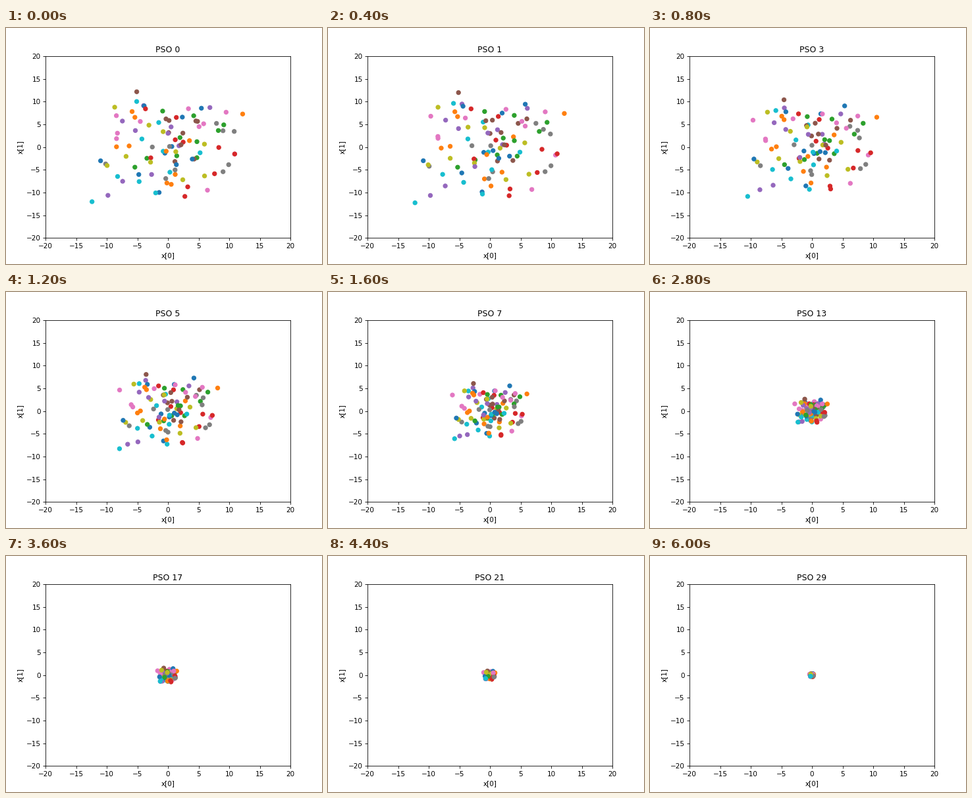
These frames come from a looping animation (480 px wide and 360 px high, 6.2 s). A matplotlib script:

```python
import numpy as np
import matplotlib.pyplot as plt
from matplotlib.animation import FuncAnimation

STEP_MS = 200
STEPS = 30
HOLD = 1  # extra ticks on the first step
COUNT = 100
REACH = 11.5

# Outlying particles, one per colour of the default cycle
OUTLIERS = [(-11, -3), (12.2, 7.3), (-5.4, -4.4), (10.9, -1.5), (-9.8, -10.6),
            (-5.1, 12.2), (9.5, 7.7), (9, -5.4), (-8.7, 8.8), (-12.4, -12)]

rng = np.random.default_rng(11)


def scatter_swarm(n):
    """Random directions, with radii denser towards the centre."""
    radius = REACH * rng.permutation((np.arange(n) + .5) / n) ** .7
    angle = rng.uniform(0, 2 * np.pi, n)
    return np.column_stack([radius * np.cos(angle), radius * np.sin(angle)])


start = np.vstack([scatter_swarm(COUNT - len(OUTLIERS)), OUTLIERS])
drift = rng.normal(0, 1.2, start.shape)
drift[-len(OUTLIERS):] *= .3
rate = rng.normal(1, .06, (COUNT, 1))


def positions(step):
    """Wander a little, then collapse exponentially after a soft start."""
    shrink = np.exp(-.132 * rate * step ** 3 / (step ** 2 + 15))
    return shrink * (start + drift * (1 - np.exp(-step / 2)))


fig, ax = plt.subplots(figsize=(6.4, 4.8), dpi=75)
ax.set(xlim=(-20, 20), ylim=(-20, 20), xlabel="x[0]", ylabel="x[1]")
title = ax.set_title("PSO 0")
dots = ax.scatter(*start.T, c=[f"C{i % 10}" for i in range(COUNT)])


def update(tick):
    step = max(0, tick - HOLD)
    dots.set_offsets(positions(step))
    title.set_text(f"PSO {step}")
    return dots, title


anim = FuncAnimation(fig, update, frames=STEPS + HOLD, interval=STEP_MS,
                     repeat=True, repeat_delay=0, blit=False)
plt.show()
```
